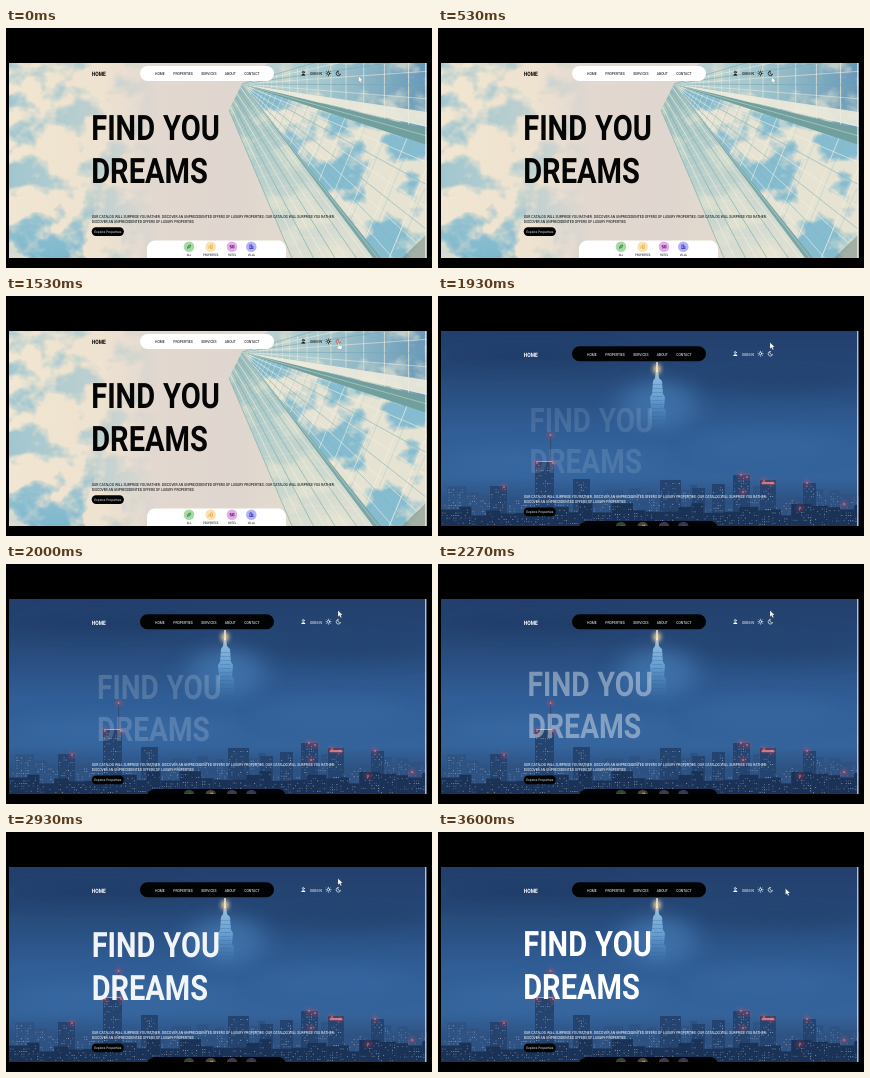
Recreate the animation shown at these times as an HTML page. Size 426 by 240 pixels, loop 3670 ms.

```html
<!DOCTYPE html>
<html lang="en">
<head>
<meta charset="utf-8">
<title>Find you dreams</title>
<style>
html, body { margin: 0; width: 100%; height: 100%; overflow: hidden; background: #000; }
svg { display: block; width: 100vw; height: 100vh; --ink: #050506; --panel: #fff; --tint: 1; }
svg.dark { --ink: #fff; --panel: #020305; --tint: .3; }
text { font-family: Roboto, sans-serif; fill: var(--ink); text-rendering: geometricPrecision; }
.panel { fill: var(--panel); }
.line { fill: none; stroke: var(--ink); stroke-width: .65; stroke-linecap: round; }
.solid { fill: var(--ink); }
.tint { opacity: var(--tint); }
.dark #day, svg:not(.dark) #night { display: none; }
</style>
</head>
<body>
<svg id="stage" viewBox="0 0 426 240">
  <defs>
    <clipPath id="view"><rect x="3" y="35" width="417.5" height="195"/></clipPath>
    <filter id="soft" x="-100%" y="-100%" width="300%" height="300%"><feGaussianBlur stdDeviation="13 8"/></filter>
    <filter id="haze" x="-100%" y="-100%" width="300%" height="300%"><feGaussianBlur stdDeviation="2"/></filter>
    <filter id="blueCloud" x="0" y="0" width="1" height="1" color-interpolation-filters="sRGB">
      <feTurbulence type="fractalNoise" baseFrequency=".025 .03" numOctaves="4" seed="8"/>
      <feColorMatrix values="0 0 0 0 .46  0 0 0 0 .71  0 0 0 0 .81  6 0 0 0 -2.75"/>
      <feComposite in2="SourceGraphic" operator="in"/>
    </filter>
    <filter id="creamCloud" x="0" y="0" width="1" height="1" color-interpolation-filters="sRGB">
      <feTurbulence type="fractalNoise" baseFrequency=".022 .03" numOctaves="4" seed="3"/>
      <feColorMatrix values="0 0 0 0 .93  0 0 0 0 .91  0 0 0 0 .82  6 0 0 0 -2.9"/>
      <feComposite in2="SourceGraphic" operator="in"/>
    </filter>
    <linearGradient id="sky">
      <stop offset="0" stop-color="#f1e6d1"/><stop offset=".22" stop-color="#eee2d0"/>
      <stop offset=".36" stop-color="#e2d8d0"/><stop offset=".55" stop-color="#dfd6cf"/>
      <stop offset=".75" stop-color="#e6decd"/>
    </linearGradient>
    <linearGradient id="fade">
      <stop offset="0" stop-color="#fff" stop-opacity=".65"/><stop offset=".6" stop-color="#fff" stop-opacity=".4"/>
      <stop offset="1" stop-color="#fff" stop-opacity="0"/>
    </linearGradient>
    <linearGradient id="rise" x2="0" y2="1">
      <stop offset="0" stop-color="#fff" stop-opacity="0"/><stop offset="1" stop-color="#fff" stop-opacity=".9"/>
    </linearGradient>
    <linearGradient id="roof">
      <stop offset="0" stop-color="#c4d5d0"/><stop offset=".45" stop-color="#a3c6cd"/>
      <stop offset="1" stop-color="#6799b8"/>
    </linearGradient>
    <linearGradient id="side" x2=".6" y2="1">
      <stop offset="0" stop-color="#94b9b8"/><stop offset=".4" stop-color="#b3cdca"/>
      <stop offset="1" stop-color="#dcded2"/>
    </linearGradient>
    <linearGradient id="dusk" x2="0" y2="1">
      <stop offset="0" stop-color="#233f6c"/><stop offset=".22" stop-color="#264877"/>
      <stop offset=".5" stop-color="#305d95"/><stop offset=".75" stop-color="#35649c"/>
      <stop offset="1" stop-color="#263f68"/>
    </linearGradient>
    <linearGradient id="spire" x2="0" y2="1">
      <stop offset="0" stop-color="#b5dcf5"/><stop offset=".5" stop-color="#6fa9da"/>
      <stop offset="1" stop-color="#3c6da8" stop-opacity=".1"/>
    </linearGradient>
  </defs>
  <g clip-path="url(#view)">
    <g id="day"></g>
    <g id="night"></g>
    <g id="page"></g>
    <rect x="419.3" y="35" width="1.2" height="195" fill="#f2f4f6"/>
  </g>
  <g id="mouse" fill="#fff" stroke="#444" stroke-width=".2">
    <path id="arrow" d="M0 0V6.2L1.5 4.9 2.6 7.2 3.6 6.7 2.6 4.5H4.5Z"/>
    <path id="hand" d="M-.6 0Q0-.7.6 0V2.3L3 2.9Q3.6 3.2 3.4 4L2.9 6H-.4L-2.2 3.7Q-1.6 3-.6 3.9Z"/>
  </g>
</svg>
<script>
const LOOP = 3670, SWITCH = 1800, FADE = 1210, CONDENSED = .83;
const $ = id => document.getElementById(id);

function add(parent, tag, attrs, label) {
  const el = document.createElementNS('http://www.w3.org/2000/svg', tag);
  for (const k in attrs) el.setAttribute(k, attrs[k]);
  if (label) el.textContent = label;
  return parent.appendChild(el);
}
const rect = (p, x, y, width, height, fill, more) => add(p, 'rect', { x, y, width, height, fill, ...more });
const panel = (p, x, y, width, height, rx) => add(p, 'rect', { x, y, width, height, rx, class: 'panel' });
const path = (p, d, more) => add(p, 'path', { d, ...more });
const blob = (p, cx, cy, rx, ry, fill, opacity, filter = 'soft') =>
  add(p, 'ellipse', { cx, cy, rx, ry, fill, opacity, filter: `url(#${filter})` });
const write = (p, x, y, size, label, more) =>
  add(p, 'text', { transform: `translate(${x} ${y}) scale(${CONDENSED} 1)`, 'font-size': size, ...more }, label);

function random(seed) {
  return () => (seed = (seed * 16807) % 2147483647) / 2147483647;
}

function drawDay(g) {
  const blue = { filter: 'url(#blueCloud)' };
  rect(g, 3, 35, 418, 195, 'url(#sky)');
  rect(g, 3, 35, 150, 195, 'url(#fade)', blue);
  rect(g, 3, 165, 85, 65, 'url(#rise)', blue);
  blob(g, 15, 222, 22, 9, '#8dbdd0', .5);
  drawTower(g);
}

function drawTower(g) {
  const apex = [236, 56];
  const mix = (a, b, k) => a.map((v, i) => v + (b[i] - v) * k);
  const poly = pts => 'M' + pts.map(p => p.map(v => v.toFixed(1)).join(' ')).join('L');
  const face = (pts, fill, more) => path(g, poly(pts) + 'Z', { fill, ...more });
  const line = (pts, stroke, width, opacity) =>
    path(g, poly(pts), { fill: 'none', stroke, 'stroke-width': width, opacity });
  const eave = [223, 82], base = [286, 230], corner = [372, 230], ridge = [421, 112], top = [421, 2];

  const front = [apex, corner, [421, 230], ridge], upper = [apex, ridge, [421, 35], [262, 35]];
  face([apex, eave, base, corner], 'url(#side)');
  face([apex, eave, base, corner], '#fff', { filter: 'url(#creamCloud)', opacity: .5 });
  face(front, '#e6e3d3');
  face(front, '#fff', { filter: 'url(#blueCloud)', opacity: .85 });
  face(upper, 'url(#roof)');
  face(upper, '#fff', { filter: 'url(#creamCloud)', opacity: .65 });

  for (let t = .1; t < 1.9; t *= 1.17) {
    const a = mix(apex, corner, t), b = mix(apex, ridge, t);
    line([a, b, mix(apex, top, t)], '#f3efdf', .5 + t * .5, .75);
    line([mix(eave, base, t * .95), a], '#eef0e4', .4, .5);
    line([mix(apex, corner, t * 1.03), mix(apex, ridge, t * 1.03)], '#79aeb6', .4, .6);
  }
  for (let i = 0; i <= 8; i++) {
    const k = i / 8, end = mix(base, corner, k);
    line([mix(eave, apex, k), end], i % 2 ? '#f0efe2' : '#7faeb0', .9, .75);
    line([apex, mix(ridge, top, k)], i % 2 ? '#e9eee4' : '#71a5b2', .8, .7);
    line([apex, mix(mix(apex, corner, 1.35), ridge, k)], i % 2 ? '#f4f0e0' : '#82b3b8', .8, .75);
  }
  face([apex, [421, 84], [421, 99]], '#efecdc', { opacity: .9 });
  face([apex, [421, 101], [421, 117]], '#709f9d');
  line([apex, [421, 108]], '#c0d2c6', .7, .9);
  face([apex, [367, 230], [375, 230]], '#7aa7a8');
  line([apex, corner], '#d8e2d6', .6, .8);
  face([[421, 206], [421, 230], [396, 230]], '#7b8f85', { opacity: .6 });
}

function drawNight(g) {
  const rnd = random(29);
  rect(g, 3, 35, 418, 195, 'url(#dusk)');
  blob(g, 90, 60, 90, 9, '#1d3863', .6);
  blob(g, 340, 85, 85, 12, '#203f6c', .5);
  blob(g, 220, 108, 38, 24, '#4a80b9', .6);
  blob(g, 120, 165, 110, 14, '#3b6ca6', .55);
  blob(g, 330, 150, 75, 14, '#3a6aa4', .5);

  path(g, 'M218 74H220L221 82 224 85 225 98 227 101 226 112 228 115 227 132H212L211 115 213 112 212 101 214 98 215 85 217 82Z', { fill: 'url(#spire)', opacity: .8 });
  for (let y = 88; y < 128; y += 4) rect(g, 214, y, 11, .7, '#2f6199', { opacity: .4 });
  blob(g, 219, 73, 4, 5, '#ffd9a0', .85, 'haze');
  rect(g, 218.3, 66, 1.4, 10, '#fff0d0');

  const house = (x, y, w, fill) => {
    rect(g, x, y, w, 230 - y, fill);
    for (let wy = y + 3; wy < 229; wy += 2.6)
      for (let wx = x + 1.2; wx < x + w - 1; wx += 2.2)
        if (rnd() < .32) rect(g, wx, wy, 1, .9, rnd() < .25 ? '#f3bfae' : '#a9cdec', { opacity: .25 + rnd() * .55 });
  };
  for (let x = 3; x < 421;) {
    const w = 7 + rnd() * 13;
    house(x, 188 + rnd() * 22, w, '#2e5282');
    x += w * .9;
  }
  [[97, 166, 19], [52, 190, 17], [135, 183, 17], [222, 184, 21], [254, 192, 13], [274, 188, 13],
   [295, 179, 17], [322, 184, 16], [365, 187, 13]].forEach(([x, y, w]) => house(x, y, w, '#25436f'));
  for (let x = 3; x < 421;) {
    const w = 8 + rnd() * 15;
    house(x, 207 + rnd() * 13, w, '#1b3257');
    x += w;
  }
  rect(g, 112, 139, 1.2, 28, '#314e78');
  rect(g, 98, 165, 17, 1, '#e78390');
  [[112.6, 139], [99, 167], [115, 167], [303, 179], [309, 181], [326, 185], [334, 187], [369, 187], [66, 191], [305, 196], [362, 212], [406, 208]]
    .forEach(([x, y]) => {
      blob(g, x, y, 2.6, 2.2, '#ff4b58', .6, 'haze');
      add(g, 'circle', { cx: x, cy: y, r: .8, fill: '#ff8b8b' });
    });
  rect(g, 324, 186, 12, 2.2, '#f4848a', { opacity: .8 });
}

function drawPage(g) {
  panel(g, 134, 38, 134, 15, 7.5);
  write(g, 85.7, 48.4, 6, 'HOME', { 'font-weight': 600 });
  [[149, 'HOME'], [167.3, 'PROPERTIES'], [195.3, 'SERVICES'], [218.8, 'ABOUT'], [238.3, 'CONTACT']]
    .forEach(([x, s]) => write(g, x, 47.3, 4.1, s));

  add(g, 'circle', { cx: 297.3, cy: 44.2, r: 1, class: 'line' });
  path(g, 'M295.2 47.6Q295.2 46 297.3 46T299.4 47.6Z', { class: 'solid' });
  write(g, 304, 47.3, 4.1, 'SIGN IN');
  add(g, 'circle', { cx: 322.5, cy: 45.4, r: 1.2, class: 'line' });
  for (let a = 0; a < 8; a++)
    path(g, 'M0-2.2V-2.5', { class: 'line', transform: `translate(322.5 45.4) rotate(${a * 45})` });
  path(g, 'M332 43.2A2.3 2.3 0 1 0 334.6 46.2 2.2 2.2 0 0 1 332 43.2Z', { class: 'line', id: 'moon' });

  const title = add(g, 'g', { id: 'title', 'font-weight': 600 });
  write(title, 85.2, 112, 35, 'FIND YOU', { 'word-spacing': 1 });
  write(title, 85.2, 155, 35, 'DREAMS');

  const offer = 'DISCOVER AN UNPRECEDENTED OFFERS OF LUXURY PROPERTIES', lead = 'OUR CATALOG WILL SURPRISE YOU RATHER.';
  write(g, 85.7, 189.7, 4.14, `${lead} ${offer}. ${lead}`);
  write(g, 85.7, 194.5, 4.14, offer);
  rect(g, 85.7, 199.3, 32.2, 8.6, '#020304', { rx: 4.3 });
  add(g, 'text', { x: 88.2, y: 204.7, 'font-size': 3.15, style: 'font-family:Inter,sans-serif;fill:#fff' }, 'Explore Properties');

  panel(g, 141, 212.6, 139, 30, 8);
  [[183, 'ALL', '#a6d9a4', '#2f8a3c', 'M-1.6 1.5Q-1.8-1.6 1.7-1.7 1.8 1.7-1.6 1.5L.7-.7'],
   [204.7, 'PROPERTIES', '#f8e2b0', '#eab354', 'M-1.8 1.8V0L0-.4V1.8M0 1.8V-1.8H1.8V1.8Z'],
   [226, 'HOTEL', '#dfb0e4', '#7b2387', 'M-.5-1.2H-2V0H-.5V1.2H-2M.5-1.2H2V1.2H.5Z'],
   [245.3, 'VILLA', '#b5b4f2', '#3b38c4', 'M-2 1.8H2M-1.4 1.8V-1.8H.4V1.8M.4-.3H1.6V1.8']]
    .forEach(([x, label, back, ink, d]) => {
      add(g, 'circle', { cx: x, cy: 218.7, r: 5.3, fill: back, class: 'tint' });
      path(g, d, { transform: `translate(${x} 218.7)`, fill: 'none', stroke: ink, 'stroke-width': .8 });
      write(g, x, 228.3, 3.2, label, { 'text-anchor': 'middle' });
    });
}

const route = [[0, 352.5, 48], [420, 333.5, 48.8], [900, 333.5, 48.8], [1200, 332.8, 47.2],
  [1750, 332.8, 47.2], [1900, 332, 46.6], [3050, 332, 46.6], [3500, 347.5, 56.5], [LOOP, 347.5, 56.5]];

function mouseAt(t) {
  const i = Math.max(1, route.findIndex(p => p[0] > t));
  const [t0, x0, y0] = route[i - 1], [t1, x1, y1] = route[i];
  const k = (t - t0) / (t1 - t0), e = k * k * (3 - 2 * k);
  return [x0 + (x1 - x0) * e, y0 + (y1 - y0) * e];
}

function render(t) {
  const dark = t >= SWITCH, hover = t >= 1000 && !dark;
  const shown = dark ? Math.min(1, (t - SWITCH) / FADE) : 1, rest = 1 - shown;
  $('stage').classList.toggle('dark', dark);
  $('page').setAttribute('transform', `translate(0 ${dark ? 12.3 : 0})`);
  $('title').setAttribute('opacity', shown);
  $('title').setAttribute('transform',
    `translate(258 ${133 + 12 * rest}) scale(${1 - .041 * rest}) translate(-258 -133)`);
  $('moon').style.stroke = hover ? '#e2483d' : '';
  $('arrow').style.display = hover ? 'none' : '';
  $('hand').style.display = hover ? '' : 'none';
  $('mouse').setAttribute('transform', `translate(${mouseAt(t)})`);
}

drawDay($('day'));
drawNight($('night'));
drawPage($('page'));
const start = performance.now();
function tick() {
  render((performance.now() - start) % LOOP);
  requestAnimationFrame(tick);
}
tick();
</script>
</body>
</html>
```
